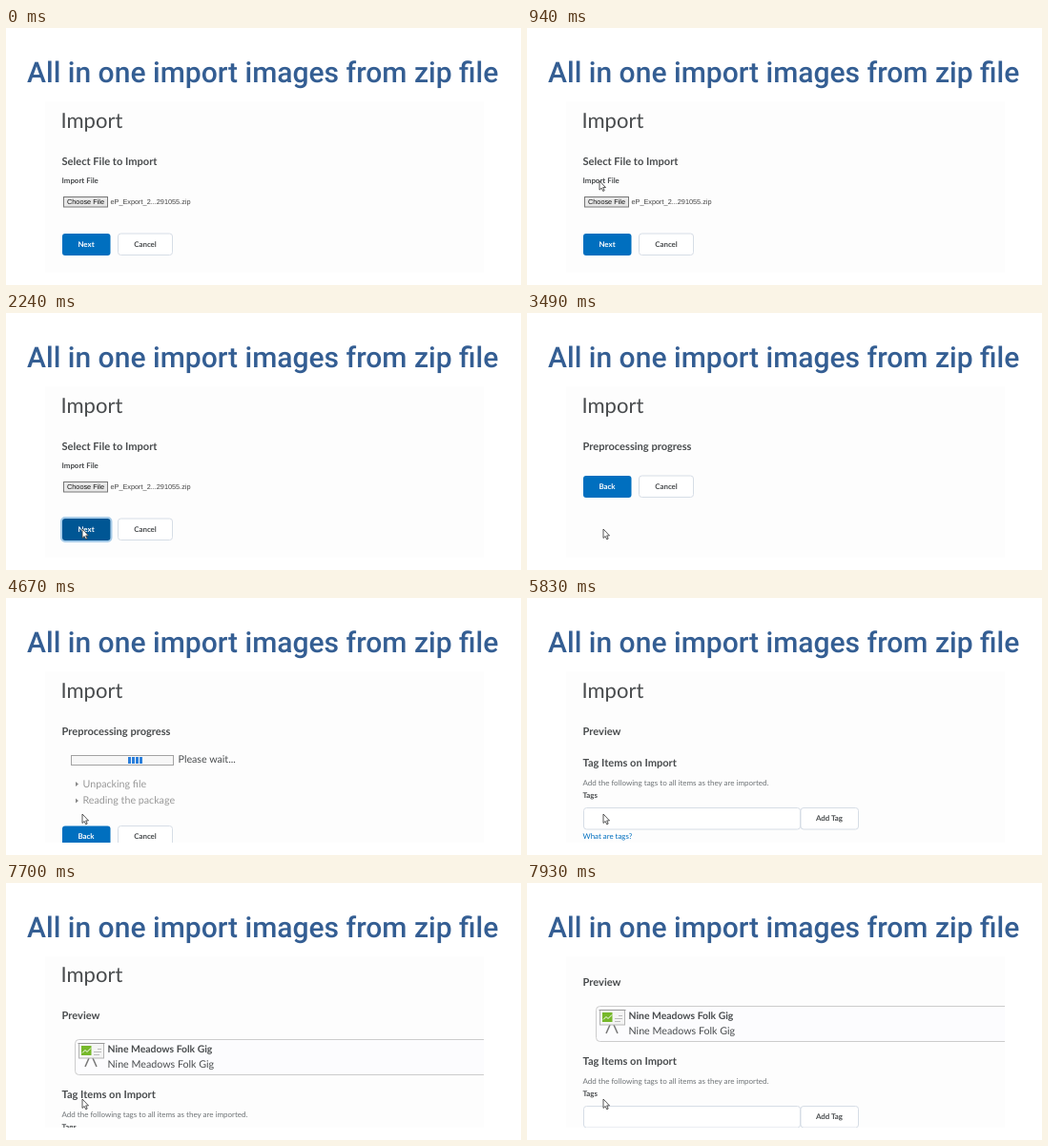
Write an HTML page that moves like this. It is 540 by 270 pixels and loops after 9870 ms.

```html
<!DOCTYPE html>
<html lang="en">
<head>
<meta charset="utf-8">
<title>Import images</title>
<style>
  html, body { margin: 0; height: 100%; overflow: hidden; background: #fff; }
  svg { display: block; width: 100%; height: 100%; }
  text { font-family: Lato, "Open Sans", sans-serif; fill: #494c4e; text-rendering: geometricPrecision; }
  .title { font: 500 30px Roboto, sans-serif; fill: #345e93; }
  .h1 { font-size: 22px; }
  .h2 { font-size: 11.1px; font-weight: 700; }
  .label { font-size: 7.9px; font-weight: 700; }
  .note { font-size: 8px; fill: #6e7376; }
  .link { font-size: 7.9px; fill: #006fbf; }
  .body { font-size: 10.7px; }
  .muted { fill: #999; }
  .file { font: 7.3px "Liberation Sans", Arial, sans-serif; fill: #444; }
  .mid { text-anchor: middle; }
  .inv { fill: #fff; }
  .box { fill: #fff; stroke: #d6dde6; }
</style>
</head>
<body>
<svg viewBox="0 0 540 270">
  <defs>
    <clipPath id="panelClip"><path d="M41 77H501V257H41Z"/></clipPath>
    <clipPath id="barClip"><path d="M69 166H175.500V175H69Z"/></clipPath>
    <g id="cancel">
      <rect class="box" x="117.500" y="216" width="57" height="22.500" rx="3"/>
      <text class="label mid" x="146" y="229.500">Cancel</text>
    </g>
    <g id="back">
      <rect x="59" y="216" width="50.500" height="23" rx="3" fill="#006fbf"/>
      <text class="label mid inv" x="84" y="229.500">Back</text>
      <use href="#cancel"/>
    </g>
  </defs>

  <text class="title" x="22" y="57">All in one import images from zip file</text>
  <path d="M41 77H501V257H41Z" fill="#fdfdfd"/>

  <g clip-path="url(#panelClip)">
    <g id="page">
      <text class="h1" x="57.500" y="105">Import</text>

      <g id="select">
        <text class="h2" x="58.500" y="144">Select File to Import</text>
        <text class="label" x="58.500" y="163">Import File</text>
        <rect x="60.500" y="177.500" width="46" height="10.500" fill="#e8e8e8" stroke="#777"/>
        <text class="file mid" x="83.500" y="185.300" style="fill:#111">Choose File</text>
        <text class="file" x="109.500" y="185.300">eP_Export_2...291055.zip</text>
        <rect id="ring" x="58" y="215" width="52.500" height="25" rx="4" fill="none" stroke="#a9cdea" stroke-width="2"/>
        <rect id="next" x="59" y="216" width="50.500" height="23" rx="3"/>
        <text class="label mid inv" x="84" y="229.500">Next</text>
        <use href="#cancel"/>
      </g>

      <g id="progress">
        <text class="h2" x="58.500" y="144">Preprocessing progress</text>
        <g id="status">
          <rect x="68.500" y="165.500" width="107" height="10" fill="#f7f7f7" stroke="#a2a2a2"/>
          <g clip-path="url(#barClip)">
            <path id="blocks" d="M0 167h3v7h-3zm4 0h3v7h-3zm4 0h3v7h-3zm4 0h3v7h-3z" fill="#2b7fdb"/>
          </g>
          <text class="body" x="180.500" y="173">Please wait...</text>
          <path d="M73 193l3 2.500l-3 2.500zM73 210.500l3 2.500l-3 2.500z" fill="#888"/>
          <text class="body muted" x="80.500" y="198.500">Unpacking file</text>
          <text class="body muted" x="80.500" y="216">Reading the package</text>
        </g>
        <use id="buttons" href="#back"/>
      </g>

      <g id="preview">
        <text class="h2" x="58.500" y="144">Preview</text>
        <g id="card">
          <rect x="72.500" y="165.500" width="440" height="37" rx="4" fill="#fcfcfe" stroke="#ccc"/>
          <path d="M87 185l-4 9M91 185l4 9" stroke="#777" stroke-width="1.500"/>
          <rect x="76.500" y="169.500" width="26" height="15.500" fill="#f4f4f4" stroke="#b5b5b5"/>
          <path d="M75.500 169.500h28" stroke="#999"/>
          <rect x="79" y="172" width="10.500" height="10" fill="#76b82a"/>
          <path d="M80 179.500l3-3l2 2l4-4" fill="none" stroke="#fff"/>
          <path d="M92 178.500h8M92 181.500h6M96 175.500h4" stroke="#bbb"/>
          <text class="h2" x="106.500" y="179" style="font-size:10.400px">Nine Meadows Folk Gig</text>
          <text class="body" x="106.500" y="194.500">Nine Meadows Folk Gig</text>
        </g>
        <g id="tags">
          <text class="h2" x="58.500" y="177">Tag Items on Import</text>
          <text class="note" x="58.500" y="197.300">Add the following tags to all items as they are imported.</text>
          <text class="label" x="58.500" y="210">Tags</text>
          <rect class="box" x="59.500" y="220.500" width="227" height="22.500" rx="3"/>
          <rect class="box" x="287" y="220.500" width="60.500" height="22.500" rx="3"/>
          <text class="label mid" x="317" y="234">Add Tag</text>
          <text class="link" x="58.500" y="253">What are tags?</text>
        </g>
      </g>
    </g>

    <circle id="click" cx="80" cy="227" r="7" fill="#8fb032"/>
    <g id="cursor" stroke-linejoin="round">
      <path id="arrow" d="M0 0v9.500l2.200-2l1.500 3.300l1.500-.7l-1.500-3.200h2.800z" fill="#fff" stroke="#444" stroke-width=".9"/>
      <path id="hand" d="M-.5 0q1.500-1 1.700 .6v3.400l3.600 .9q1 .3 .9 1.600l-.6 3.200l-.8 1.800h-4.500l-2.500-4q-.7-1.500 .5-1.400l1.400 1z" fill="#fff" stroke="#222" stroke-width=".9"/>
    </g>
  </g>
</svg>

<script>
const LOOP = 9870, STEP = 78.3;
const el = id => document.getElementById(id);
const show = (id, on) => el(id).style.display = on ? "" : "none";
const move = (id, x, y) => el(id).setAttribute("transform", `translate(${x} ${y})`);
const clamp = v => Math.max(0, Math.min(1, v));
const smooth = v => v * v * (3 - 2 * v);
const stepsSince = (t, start) => Math.floor((t - start + 8) / STEP);

function draw(t) {
  show("select", t < 3490);
  show("progress", t >= 3490 && t < 5830);
  show("preview", t >= 5830);

  // Pointer travels down to the Next button
  const p = smooth(clamp((stepsSince(t, 470) + 1) / 13));
  const y = 77 + 150 * p;
  const over = y > 216 && t < 2240;
  show("cursor", t >= 470);
  move("cursor", 71 + 9 * p, y);
  show("hand", over);
  show("arrow", !over);
  el("next").setAttribute("fill", y > 216 ? "#005694" : "#006fbf");
  show("ring", t >= 1470);
  show("click", t >= 1470 && t < 2040);
  el("click").setAttribute("opacity", 0.95 * clamp((2040 - t) / 400));

  // Indeterminate progress bar
  show("status", t >= 3960);
  move("blocks", 56 + 8 * stepsSince(t, 3960), 0);
  move("buttons", 0, t < 3960 ? -45 : 23.5);

  // Preview card pushes the tag form down, then the page scrolls
  const loaded = t >= 6140;
  show("card", loaded);
  move("tags", 0, loaded ? 50 : 0);
  const scroll = t < 7700 ? 0 : 1 + 35 * smooth(clamp(stepsSince(t, 7700) / 3));
  move("page", 0, -scroll);
}

const start = performance.now();
function tick() {
  draw((performance.now() - start) % LOOP);
  requestAnimationFrame(tick);
}
tick();
</script>
</body>
</html>
```
